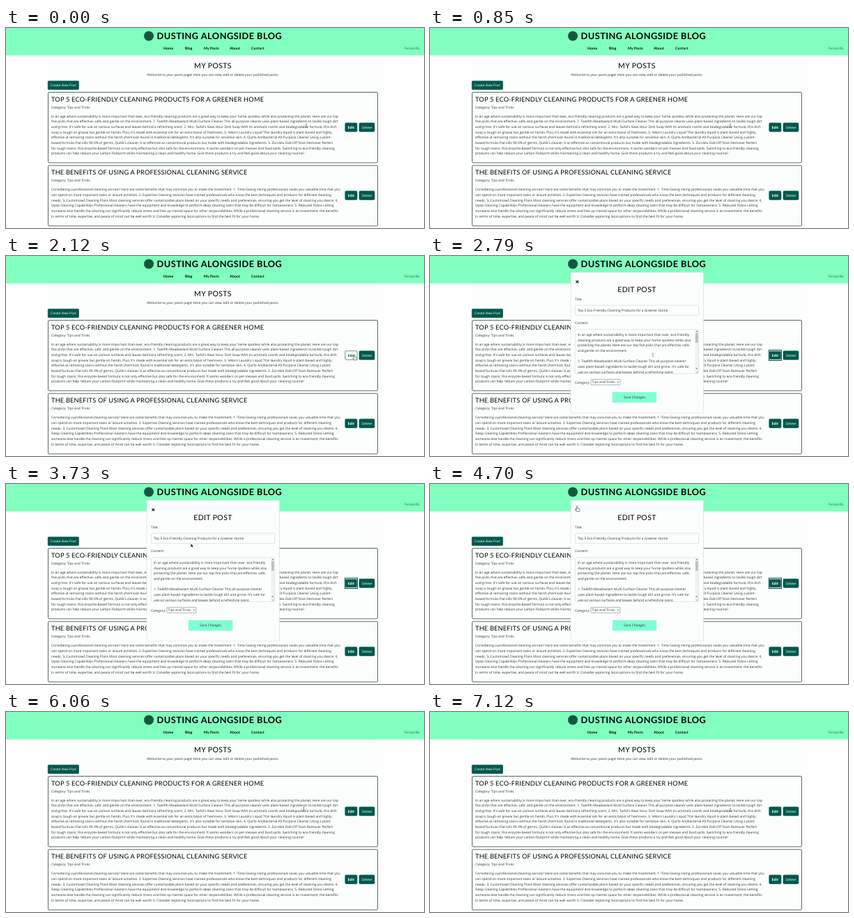
An HTML page that plays this animation: 600x288 px, repeating every 7360 ms.

```html
<!DOCTYPE html>
<html lang="en">
<head>
<meta charset="utf-8">
<title>My Posts</title>
<style>
  html, body { margin: 0; height: 100%; overflow: hidden; background: #fefefe; }
  svg { display: block; width: 100vw; height: 100vh; }
  text { font: 4.835px "Open Sans", sans-serif; fill: #2b3131; text-rendering: geometricPrecision; white-space: pre; }
  .head { font: 9.2px Lato, sans-serif; letter-spacing: .21px; fill: #000; }
  .page { font-size: 10.5px; letter-spacing: .38px; }
  .brand { font: bold 12.8px Lato, sans-serif; letter-spacing: .46px; fill: #000; }
  .nav { font: bold 5.1px Lato, sans-serif; letter-spacing: .12px; fill: #000; }
  .user { font: 5px Lato, sans-serif; fill: #3c7260; }
  .mid { text-anchor: middle; }
  .btn rect { fill: #00594c; stroke: #00594c; stroke-width: .6; }
  .btn text { fill: #fff; }
  .bold text { font-weight: bold; }
  .hover rect { fill: #fff; }
  .hover text { fill: #00594c; }
  .focus rect { stroke: #fff; outline: .8px solid #00594c; }
  .field { fill: #fcfefd; stroke: #c4caca; stroke-width: .5; }
</style>
</head>
<body>
<svg id="stage" viewBox="0 0 600 288"></svg>
<script>
const LOOP = 7360, OPEN = 2300, CLOSE = 5300, LINE = 7.64;

const label = (x, y, s, cls = '') => `<text x="${x}" y="${y}" class="${cls}">${s}</text>`;
const lines = (x, y, list) => list.map((s, i) => label(x, y + i * LINE, s)).join('');
const rect = (x, y, w, h, attrs) => `<rect x="${x}" y="${y}" width="${w}" height="${h}" ${attrs}/>`;
const button = (x, y, w, s, cls = '', id = '') =>
  `<g class="btn ${cls}" id="${id}">${rect(x, y, w, 12.6, 'rx="1.4"')}${label(x + w / 2, y + 8, s, 'mid')}</g>`;

function post(y, h, title, body, btnY, id) {
  return rect(60.5, y, 473, h, 'rx="1.4" fill="#fcfefd" stroke="#2f4642" stroke-width=".8"') +
    label(65, y + 13, title, 'head') +
    label(65, y + 23.2, 'Category: Tips and Tricks') +
    lines(65, y + 36.3, body) +
    button(486.8, btnY, 17.2, 'Edit', 'bold', id) +
    button(507, btnY, 22, 'Delete');
}

const ecoPost = [
  'In an age where sustainability is more important than ever, eco-friendly cleaning products are a great way to keep your home spotless while also protecting the planet. Here are our top',
  'five picks that are effective, safe, and gentle on the environment. 1. Twelfth Meadowlark Multi-Surface Cleaner This all-purpose cleaner uses plant-based ingredients to tackle tough dirt',
  "and grime. It's safe for use on various surfaces and leaves behind a refreshing scent. 2. Mrs. Tarbil's Neat Hour Dish Soap With its aromatic scents and biodegradable formula, this dish",
  "soap is tough on grease but gentle on hands. Plus, it's made with essential oils for an extra boost of freshness. 3. Velorn Laundry Liquid This laundry liquid is plant-based and highly",
  "effective at removing stains without the harsh chemicals found in traditional detergents. It's also suitable for sensitive skin. 4. Quillo Antibacterial All-Purpose Cleaner Using a plant-",
  "based formula that kills 99.9% of germs, Quillo's cleaner is as effective as conventional products but made with biodegradable ingredients. 5. Zorvikle Dab-Off Stain Remover Perfect",
  'for tough stains, this enzyme-based formula is not only effective but also safe for the environment. It works wonders on pet messes and food spills. Switching to eco-friendly cleaning',
  'products can help reduce your carbon footprint while maintaining a clean and healthy home. Give these products a try and feel good about your cleaning routine!'
];
const servicePost = [
  'Considering a professional cleaning service? Here are some benefits that may convince you to make the investment. 1. Time-Saving Hiring professionals saves you valuable time that you',
  'can spend on more important tasks or leisure activities. 2. Expertise Cleaning services have trained professionals who know the best techniques and products for different cleaning',
  'needs. 3. Customized Cleaning Plans Most cleaning services offer customizable plans based on your specific needs and preferences, ensuring you get the level of cleaning you desire. 4.',
  'Deep Cleaning Capabilities Professional cleaners have the equipment and knowledge to perform deep cleaning tasks that may be difficult for homeowners. 5. Reduced Stress Letting',
  'someone else handle the cleaning can significantly reduce stress and free up mental space for other responsibilities. While a professional cleaning service is an investment, the benefits',
  'in terms of time, expertise, and peace of mind can be well worth it. Consider exploring local options to find the best fit for your home.'
];
const draft = [
  'In an age where sustainability is more important than ever, eco-friendly',
  'cleaning products are a great way to keep your home spotless while also',
  'protecting the planet. Here are our top five picks that are effective, safe,',
  'and gentle on the environment.',
  '',
  '1. Twelfth Meadowlark Multi-Surface Cleaner This all-purpose cleaner',
  "uses plant-based ingredients to tackle tough dirt and grime. It's safe for",
  'use on various surfaces and leaves behind a refreshing scent.'
];
const menu = [[226, 'Home'], [257, 'Blog'], [284, 'My Posts'], [321.3, 'About'], [352, 'Contact']];

const page =
  rect(60, 40, 474, 248, 'fill="#fcfefd"') +
  rect(0, 0, 600, 39.5, 'fill="#80ffbf"') +
  '<circle cx="205" cy="11.5" r="7" fill="#17573f"/>' +
  label(216.5, 16.3, 'DUSTING ALONGSIDE BLOG', 'brand') +
  menu.map(([x, s]) => label(x, 31, s, 'nav')).join('') +
  label(572, 31, 'Fendorilla', 'user') +
  label(297, 58.4, 'MY POSTS', 'head page mid') +
  label(297, 68.9, 'Welcome to your posts page! Here you can view, edit or delete your published posts.', 'mid') +
  button(60.2, 76.2, 44.3, 'Create New Post') +
  post(92.5, 101.5, 'TOP 5 ECO-FRIENDLY CLEANING PRODUCTS FOR A GREENER HOME', ecoPost, 136.7, 'edit') +
  post(198, 87, 'THE BENEFITS OF USING A PROFESSIONAL CLEANING SERVICE', servicePost, 234.8, 'edit2');

const modal = '<g id="modal">' +
  rect(202, 23.5, 190.5, 202.5, 'fill="#fcfefd" stroke="#d3dada" stroke-width=".6"') +
  '<path d="M209.5 35.3l3.6 3.6m0-3.6l-3.6 3.6" stroke="#000" stroke-width="1.1"/>' +
  label(297, 52.4, 'EDIT POST', 'head page mid') +
  label(208, 63.5, 'Title:') +
  rect(208.2, 71, 177.6, 14.6, 'rx="1.4" class="field"') +
  label(212, 80.1, 'Top 5 Eco-Friendly Cleaning Products for a Greener Home') +
  label(208, 97.8, 'Content:') +
  rect(208.2, 106, 177.6, 63.4, 'rx="1.4" class="field"') +
  '<clipPath id="area"><path d="M208 106h172v63.2h-172z"/></clipPath>' +
  `<g clip-path="url(#area)">${lines(212, 115.1, draft)}</g>` +
  rect(380.4, 106.3, 5, 62.8, 'fill="#f0f2f2"') +
  rect(381, 111, 3.8, 14, 'fill="#bcc1c1"') +
  '<path d="M381.4 109.3l1.5-1.6 1.5 1.6zM381.4 161.5l1.5 1.6 1.5-1.6z" fill="#555"/>' +
  '<path d="M381.8 168.5l3-3m-1.2 3l1.2-1.2" stroke="#666" stroke-width=".5"/>' +
  label(208, 183.5, 'Category:') +
  rect(231, 177.6, 42, 8, 'rx=".8" fill="#fff" stroke="#666" stroke-width=".5"') +
  label(232.6, 183.4, 'Tips and Tricks') +
  '<path d="M268.6 180.8l1.4 1.5 1.4-1.5" fill="none" stroke="#222" stroke-width=".6"/>' +
  rect(261.8, 196, 63.4, 15.2, 'rx=".6" fill="#80ffd2"') +
  label(293.5, 205.4, 'Save Changes', 'mid') + '</g>';

const cursor = '<g id="cursor">' +
  '<path id="arrow" d="M0 0v5l1.2-1.1.8 1.7.8-.4-.8-1.6h1.6z" fill="#111" stroke="#fff" stroke-width=".15"/>' +
  '<path id="beam" d="M-.9 0h1.8M0 0v4.6M-.9 4.6h1.8" stroke="#111" stroke-width=".4"/>' +
  '<path id="hand" d="M-.8.6a.8.8 0 0 1 1.6 0v2.5l2.5.6q.8.3.7 1.2l-.5 2.6h-3.7l-2.3-2.8q.2-.9 1.7.1z" fill="#fff" stroke="#111" stroke-width=".5"/></g>';

document.getElementById('stage').innerHTML = page + modal + cursor;
const el = Object.fromEntries(['edit', 'modal', 'cursor', 'arrow', 'beam', 'hand']
  .map(id => [id, document.getElementById(id)]));
const show = (node, on) => { node.style.display = on ? '' : 'none'; };

// time, x, y of the pointer
const track = [
  [0, 431, 138.5], [1330, 431, 138.5], [1960, 500, 142.3], [2330, 500, 142.3],
  [2760, 320, 140], [3060, 320, 140], [4400, 211, 32], [4700, 211, 32],
  [5100, 211, 37.6], [5330, 211, 37.6], [6120, 431, 138.5], [LOOP, 431, 138.5]
];
function pointer(t) {
  const i = track.findIndex(k => k[0] > t);
  const [t0, x0, y0] = track[i - 1], [t1, x1, y1] = track[i];
  const p = (t - t0) / (t1 - t0), e = p * p * (3 - 2 * p);
  return [x0 + (x1 - x0) * e, y0 + (y1 - y0) * e];
}

function draw(now) {
  const t = now % LOOP, open = t >= OPEN && t < CLOSE, [x, y] = pointer(t);
  const onEdit = !open && x > 487 && x < 504;
  const onClose = open && x < 214;
  const onText = open ? x < 380 && y > 106 : x < 480 && y > 123;
  show(el.modal, open);
  show(el.hand, onEdit || onClose);
  show(el.beam, onText);
  show(el.arrow, !onEdit && !onClose && !onText);
  el.cursor.setAttribute('transform', `translate(${x} ${y})`);
  el.edit.classList.toggle('hover', onEdit);
  el.edit.classList.toggle('focus', open);
  requestAnimationFrame(() => draw(performance.now() - start));
}
const start = performance.now();
draw(0);
</script>
</body>
</html>
```
